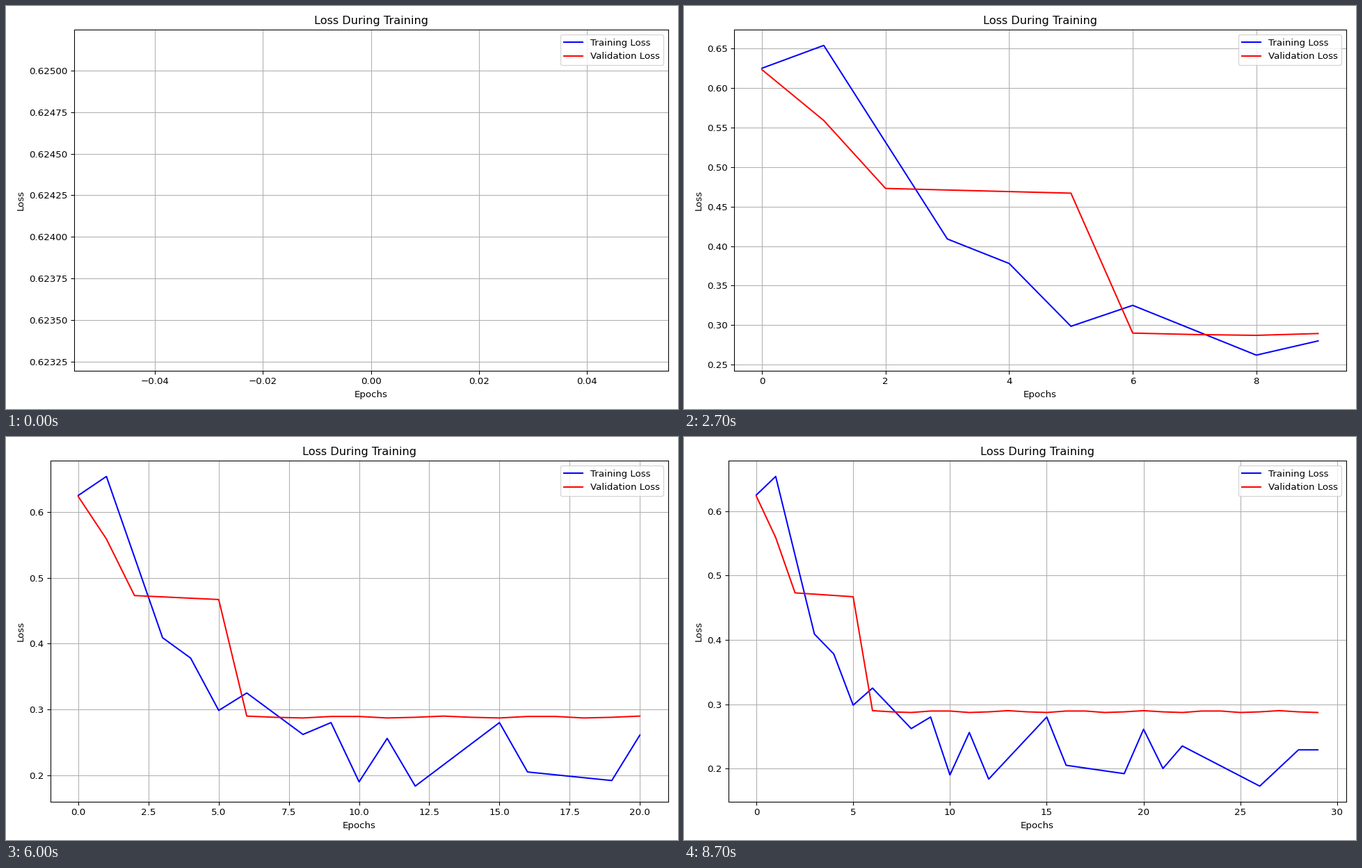
A matplotlib script that plays this animation: 966 by 580 pixels, repeating every 9 s.

```python
import matplotlib.pyplot as plt
import numpy as np
from matplotlib.animation import FuncAnimation

EPOCHS = np.arange(30)
STEP_MS = 300

# turning points (epoch, loss); epochs in between lie on straight lines
TRAIN_TURNS = [(0, 0.62515), (1, 0.654), (3, 0.409), (4, 0.378), (5, 0.2985),
               (6, 0.325), (8, 0.262), (9, 0.28), (10, 0.19), (11, 0.256),
               (12, 0.1835), (15, 0.28), (16, 0.205), (19, 0.192), (20, 0.261),
               (21, 0.2), (22, 0.235), (26, 0.1726), (28, 0.229)]
VALID_TURNS = [(0, 0.62329), (1, 0.559), (2, 0.473), (5, 0.467), (6, 0.2884)]


def curve(turns):
    return np.interp(EPOCHS, *zip(*turns))


# the validation loss settles into a small ripple around its plateau
ripple = 0.0015 * np.cos(2 * np.pi * (EPOCHS - 6) / 3.5)
train = curve(TRAIN_TURNS)
valid = curve(VALID_TURNS) + np.where(EPOCHS > 5, ripple, 0)

plt.rcParams["font.family"] = "DejaVu Sans"
fig = plt.figure(figsize=(10, 6.005), dpi=96.6)  # 966 x 580 pixels


def draw(epoch):
    fig.clear()
    # start every layout from the same margins
    fig.subplots_adjust(left=0.125, right=0.9, bottom=0.11, top=0.88)
    ax = fig.add_subplot()
    ax.plot(train[:epoch + 1], color="blue", label="Training Loss")
    ax.plot(valid[:epoch + 1], color="red", label="Validation Loss")
    ax.set_title("Loss During Training")
    ax.set_xlabel("Epochs")
    ax.set_ylabel("Loss")
    ax.legend(loc="upper right")
    ax.grid(True)
    fig.tight_layout()
    return []


anim = FuncAnimation(fig, draw, frames=len(EPOCHS), init_func=lambda: [],
                     interval=STEP_MS, repeat=True, repeat_delay=0)
plt.show()
```
